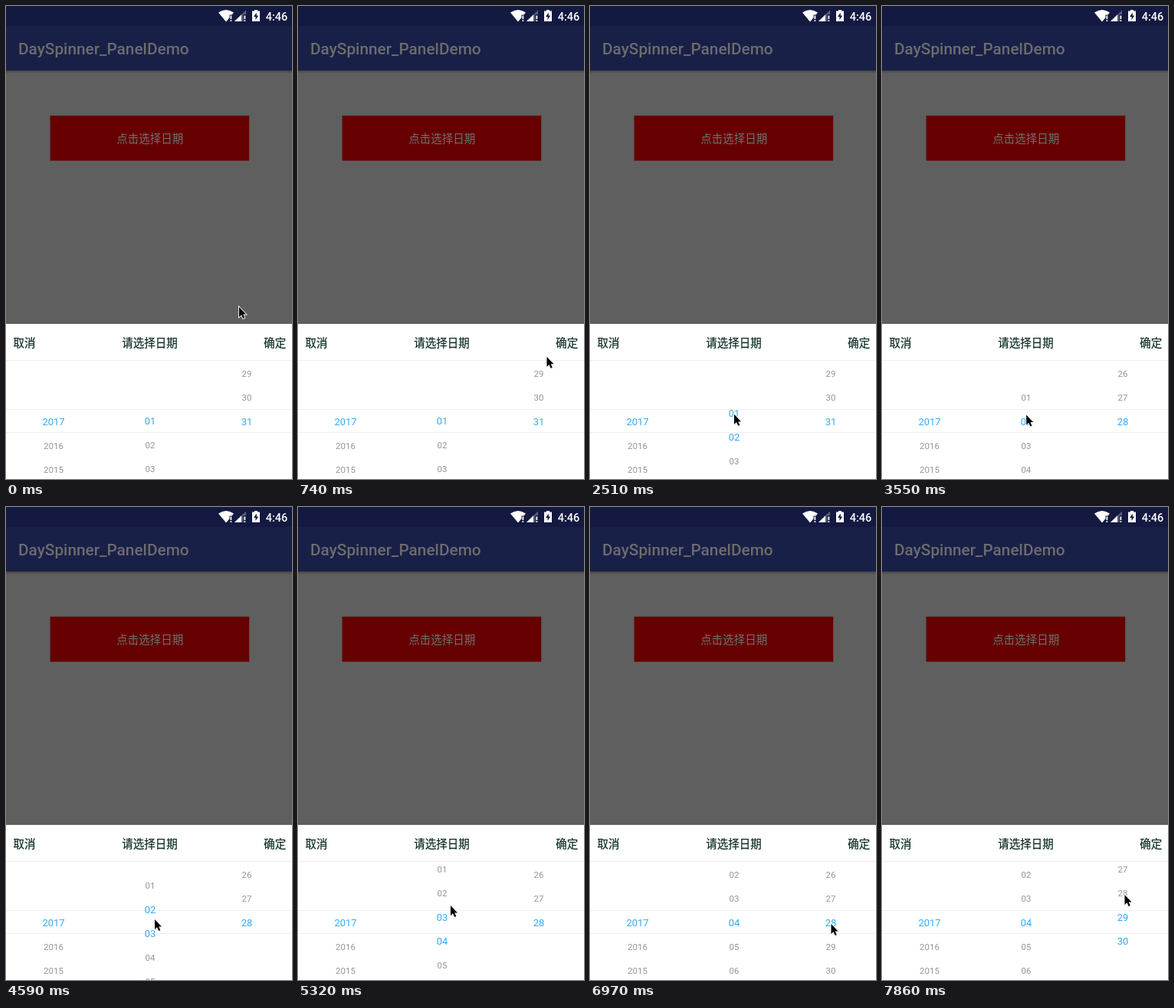
Write an HTML page that moves like this. It is 373 px wide and 616 px high and loops after 8000 ms.

```html
<!DOCTYPE html>
<html lang="zh-CN">
<head>
<meta charset="utf-8">
<title>Date wheel</title>
<style>
  html, body { margin: 0; width: 100%; height: 100%; overflow: hidden; background: #5f5f5f; }
  svg { display: block; }
  text { font-family: Roboto, "Noto Sans CJK SC", "Noto Sans CJK", sans-serif; font-size: 14.5px; }
  .mid, #wheels text { text-anchor: middle; }
  .bar { fill: #12302a; stroke: #12302a; stroke-width: .25px; }
  .rule { fill: #efefef; }
  .bold { font-weight: 500; }
  .on { font-size: 13px; fill: #33a9f5; }
  .off { font-size: 11.5px; fill: #949494; }
</style>
</head>
<body>
<svg width="373" height="616" viewBox="0 0 373 616">
  <defs>
    <linearGradient id="shade" x2="0" y2="1">
      <stop stop-color="#444"/><stop offset="1" stop-color="#5f5f5f"/>
    </linearGradient>
    <clipPath id="view"><rect y="462" width="373" height="154"/></clipPath>
    <path id="arrow" d="M1 1V14L4 11.3 6.2 16 8.3 15.1 6.2 10.6H10Z"/>
  </defs>

  <rect width="373" height="616" fill="#5f5f5f"/>
  <rect width="373" height="26" fill="#131940"/>
  <rect y="26" width="373" height="58" fill="#192048"/>
  <rect y="84" width="373" height="4" fill="url(#shade)"/>
  <text x="16" y="63.2" class="bold" style="font-size:20.8px" fill="#6c6c6c">DaySpinner_PanelDemo</text>

  <g fill="#fff">
    <path d="M277 8.5Q287 1.5 297 8.5L294.5 11.5H291.5V15.3L287 20.5Z"/>
    <path d="M292.5 12.5h1.8v4.5h-1.8zm0 5.7h1.8v1.8h-1.8z"/>
    <path d="M298 20L313 5.5V11H309.5V20Z" opacity=".3"/>
    <path d="M298 20L307 11.3V20Z"/>
    <path d="M310.5 12.5h1.8v4.5h-1.8zm0 5.7h1.8v1.8h-1.8z"/>
    <path d="M324 5h4v1.5h3v13.5h-10v-13.5h3z"/>
    <path d="M326.8 8.5L323 14H325.5V18L329.2 12.5H326.8Z" fill="#131940"/>
    <text x="338.7" y="18.6" class="bold">4:46</text>
  </g>

  <rect x="57.6" y="142.8" width="259.6" height="58.7" fill="#660000"/>
  <text x="187.7" y="178.3" class="mid" fill="#707070">点击选择日期</text>

  <rect y="414" width="373" height="202" fill="#fff"/>
  <g class="bar">
    <text x="9.5" y="444">取消</text>
    <text x="187.5" y="444" class="mid">请选择日期</text>
    <text x="336.3" y="444">确定</text>
  </g>
  <g class="rule">
    <rect y="461" width="373" height="1"/>
    <rect y="525" width="373" height="1"/>
    <rect y="555" width="373" height="1"/>
  </g>
  <g id="wheels" clip-path="url(#view)"></g>
  <g id="cursor">
    <use href="#arrow" x="1" y="1" opacity=".25"/>
    <use href="#arrow" stroke="#fff" stroke-width="1.8" paint-order="stroke"/>
  </g>
</svg>
<script>
const LOOP = 8000, TICK = 148.3, ROW = 31.4, CENTER = 541.2;
const wheels = document.getElementById('wheels');
const cursor = document.getElementById('cursor');

const smooth = p => p * p * (3 - 2 * p);
const two = i => String(i).padStart(2, '0');

// Progress from tick a to tick b, held at 0 before and 1 after
const glide = (n, a, b) => Math.min(1, Math.max(0, (n - a) / (b - a)));

function pointer(n) {
  const enter = glide(n, 2, 9);       // swing over to the months
  const flick = glide(n, 14, 18);     // first drag
  const back = glide(n, 23, 25) ** 2;
  const drag = glide(n, 27, 35);      // second drag
  const cross = glide(n, 41, 47);     // over to the days
  const pull = glide(n, 48, 53);      // drag the days
  const x = 303 - 116 * enter + 72 * Math.sin(Math.PI * enter) + back + 10 * drag + 115.5 * cross + 2 * pull;
  const y = 391 + 151 * enter - 13 * flick - 5 * flick ** 4 + 30 * back - 36 * drag + 24 * cross - 38 * pull;
  return [x, y];
}

const month = n => 1.02 + 0.98 * smooth(glide(n, 14.4, 21))
  + 1.22 * glide(n, 27, 36) + 0.78 * smooth(glide(n, 37, 40));
const day = n => n < 21 ? 31 : 28 + 1.22 * glide(n, 48, 53);
const daysInMonth = n => n < 21 ? 31 : n < 40 ? 28 : 30;

function wheel(x, pos, count, label) {
  let out = '';
  for (let i = Math.max(1, Math.floor(pos) - 2); i <= Math.min(count, Math.ceil(pos) + 3); i++) {
    const active = Math.abs(i - pos) < 0.97;
    const y = CENTER + (i - pos) * ROW + (active ? 4.6 : 4.1);
    out += `<text x="${x}" y="${y}" class="${active ? 'on' : 'off'}">${label(i)}</text>`;
  }
  return out;
}

function draw(now) {
  const n = Math.floor((now % LOOP + 22) / TICK);
  wheels.innerHTML =
    wheel(62, 1, 20, i => 2018 - i) +
    wheel(188, month(n), 12, two) +
    wheel(314, day(n), daysInMonth(n), two);
  cursor.setAttribute('transform', `translate(${pointer(n)})`);
}

const start = performance.now();
function frame() {
  draw(performance.now() - start);
  requestAnimationFrame(frame);
}
frame();
</script>
</body>
</html>
```
